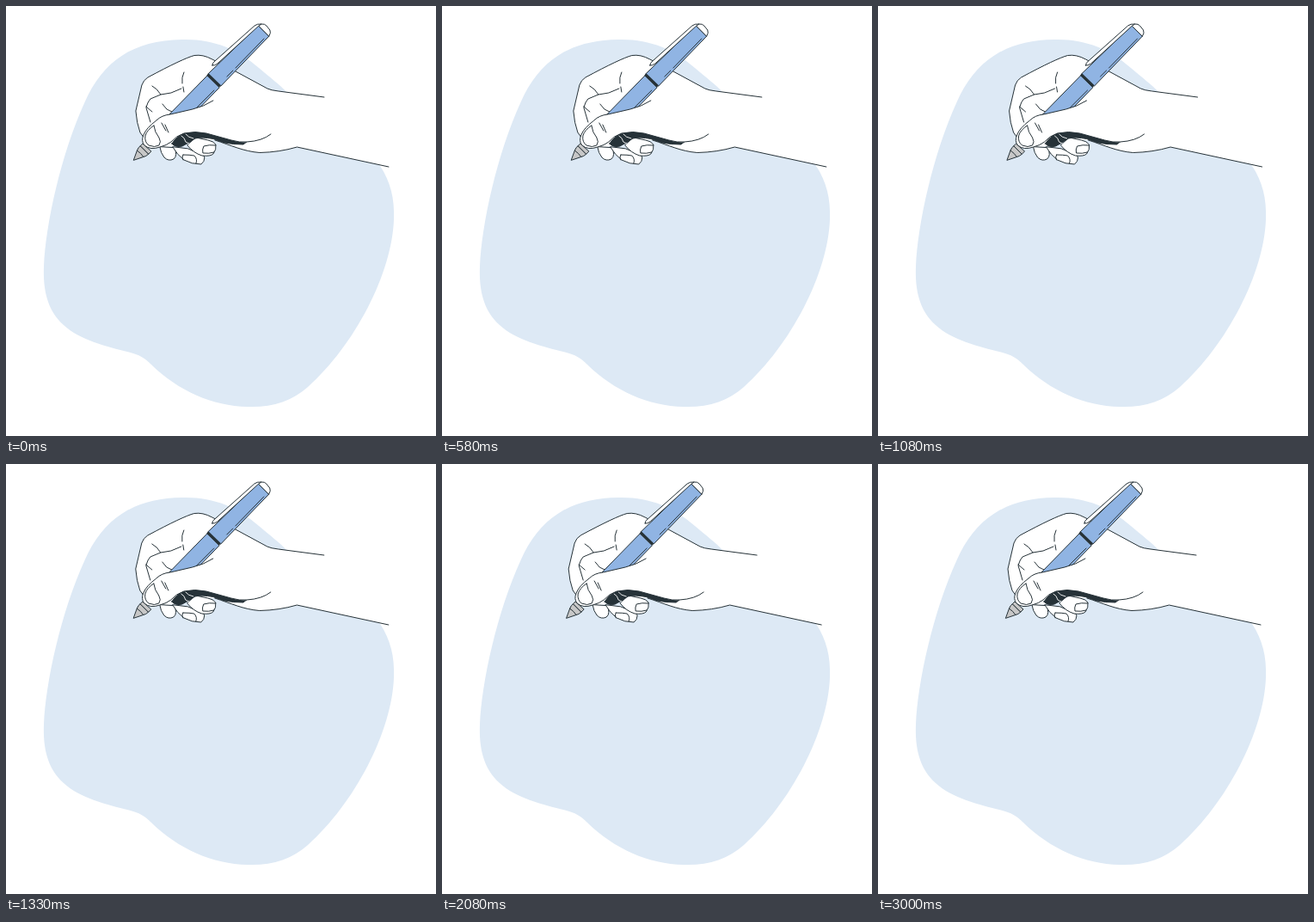
Write an HTML page that moves like this. It is 500 px wide and 500 px high and loops after 3040 ms.

```html
<!DOCTYPE html>
<html lang="en">
<head>
<meta charset="utf-8">
<title>Writing hand</title>
<style>
  html, body { margin: 0; width: 100%; height: 100%; overflow: hidden; background: #fff; }
  svg { display: block; width: 100vw; height: 100vh; }
  #hand { fill: none; stroke: #263238; stroke-width: 1; stroke-linecap: round; stroke-linejoin: round; }
  #hand .skin { fill: #fff; stroke: none; }
  #hand .white { fill: #fff; }
  #hand .blue { fill: #90b4e3; }
  #hand .grey { fill: #c7c7c7; }
  #hand .dark { fill: #263238; }
  #hand .crease { stroke: #fff; stroke-width: .9; }
</style>
</head>
<body>
<svg viewBox="0 0 500 500">
  <path fill="#dde9f5" d="M205 39C241 38 269 50 294 72C308 84 318 91 328 102C360 132 414 156 435 186
    C447 204 452 224 451 248C449 310 406 394 351 443C332 460 309 467 281 466C240 465 201 448 169 417
    C161 409 155 405.500 143 402.500C117 396 85 388 67 371C48 354 43 330 44 303C46 254 64 172 91.500 112C113 64 147 40 205 39Z"/>
  <g id="hand">
    <!-- palm, arm and index finger -->
    <path class="skin" d="M370 106L317 99Q308 98 304 96L267 76L240 62Q229 56 219 58Q206 61 165 83Q160 86 158 92
      L151 122Q152 136 156 147L161 154L180 165L196 163L222 156L243 156C262 162 276 169 295 170.500Q318 170 338.500 164L445 187Z"/>
    <path d="M370 106L317 99Q308 98 304 96L267 76L240 62Q229 56 219 57.500Q206 61 165 83Q160 86 158 92L151 122Q152 136 156 147L161 154"/>
    <path d="M170 93Q176 96 180 103L192 101L204 96M180 103L168 108Q165 111 163 118L168 135
      M163 117L170 123M207 77Q204 83 205 90M206 94L207 100M182 114L187 120L193 123"/>

    <!-- curled fingers -->
    <path class="white" d="M179 164Q180 171 184 176Q189 181 195 178Q200 174 196 165Z"/>
    <path class="white" d="M194 164Q199 173 207 179Q216 184 227 184Q231 181 231 176Q230 173 226 172L212 166Z"/>
    <path d="M206 173Q214 173 219 174Q223 178 221 183M206 173Q204 176 206 179"/>
    <path class="white" d="M211 162Q218 171 228 174Q238 175 241 172Q245 167 244 161Q241 157 235 156L221 153Z"/>
    <path d="M244 162Q236 161 230 163Q228 167 229 171Q236 172 242 170"/>

    <!-- shade under the palm -->
    <path class="dark" d="M193 160Q199 151 207 148Q220 145 233 148L262 156Q272 159 280 158L276 161Q264 161 254 159
      L241 154.500Q228 152 220 154Q213 159 205 163Q197 165 193 160Z"/>
    <path class="crease" d="M204 151Q208 153 209 158L213 160M209 149Q212 153 218 154"/>
    <path d="M243 156C262 162 276 169 295 170.500Q318 170 338.500 164L445 187"/>

    <!-- pen -->
    <path class="grey" d="M148.500 179L152.500 168Q154 164 156.500 162.500L166 172Q163 175 160 175.500Z"/>
    <path class="grey" d="M156.500 162.500L159 160L169 169L166 172Z"/>
    <path d="M152.500 168Q157 171 160 175.500"/>
    <path class="blue" d="M234 81L190 126L214 130L248 95Z"/>
    <path d="M242 98L222 118"/>
    <path class="blue" d="M235 79L293.500 22.500L306 35L250 93Z"/>
    <path d="M234.500 79.500L249 93.500" stroke-width="3.200" stroke-linecap="butt"/>
    <path d="M257 82L264 75M267 72L300 38"/>
    <path class="white" d="M293.500 22.500L297 21Q301 20.500 303 23L307 28Q308.500 31 306 35Z"/>
    <path class="white" d="M240 69Q240 66 243 64L289 23Q292 20.500 297 21L293.500 23.500L246 67Q242 70 240 69Z"/>

    <!-- thumb -->
    <path class="skin" d="M241 110Q230 117 217 120L191 126Q181 127 175 133Q163 142 160 150Q157 157 161 162Q168 168 179 164
      Q187 162 192 158Q198 151 207 148Q220 145 233 148L262 156Q272 159 280 158L300 140Z"/>
    <path d="M241 110Q230 117 217 120L191 126Q181 127 175 133Q163 142 160 150Q157 157 161 162Q168 168 179 164Q187 162 192 158
      Q198 151 207 148Q220 145 233 148L262 156Q272 159 280 158Q298 157 308 149"/>
    <path d="M172 139Q164 144 162 151Q161 158 166 162Q173 165 178 162Q181 158 178 153Q173 147 172 139
      M181 136L186 145M185 138L189 147"/>
  </g>
</svg>
<script>
  const LOOP = 3040, CYCLE = 3000, STEP = 1000 / 24, LEAD = 25;
  const SHAKE = [0, -1, 2, -4, 4, -4, 4, -4, 2, -1, 0];
  const hand = document.getElementById('hand');

  // Linear shake between evenly spaced stops.
  function shift(ms) {
    const p = Math.min(ms / CYCLE, 1) * (SHAKE.length - 1);
    const i = Math.min(Math.floor(p), SHAKE.length - 2);
    return SHAKE[i] + (SHAKE[i + 1] - SHAKE[i]) * (p - i);
  }

  const start = performance.now();
  function draw() {
    const t = Math.max(0, performance.now() - start) % LOOP;
    const tick = Math.min(72, Math.floor((t + 5) / STEP));
    hand.setAttribute('transform', `translate(${shift(tick * STEP + LEAD).toFixed(3)} 0)`);
    requestAnimationFrame(draw);
  }
  draw();
</script>
</body>
</html>
```
